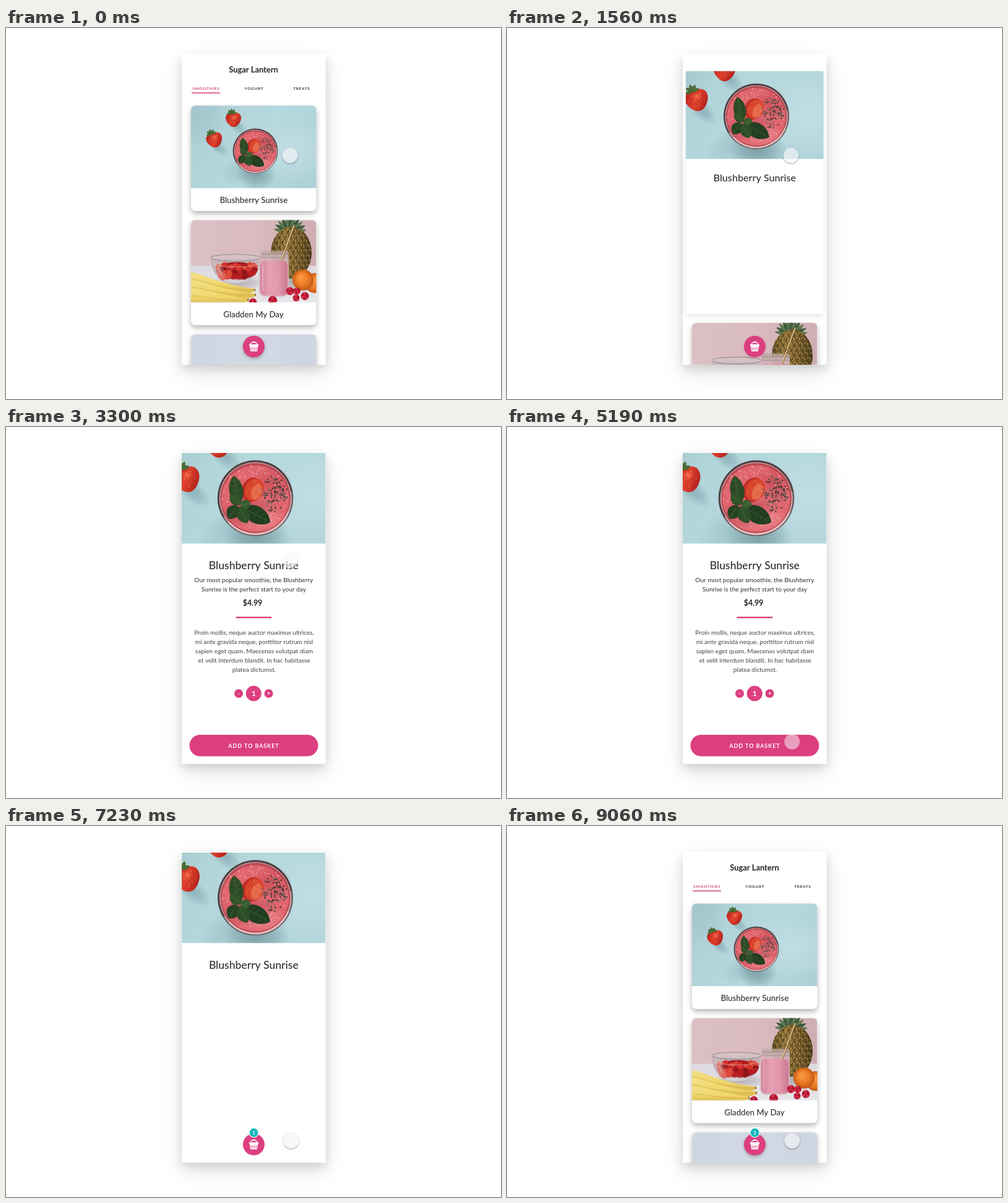
An HTML page with a canvas that plays this animation: 800x600 px, repeating every 9150 ms.

```html
<!DOCTYPE html>
<html lang="en">
<head>
<meta charset="utf-8">
<title>Smoothie shop</title>
<style>
html, body { margin: 0; width: 100%; height: 100%; overflow: hidden; background: #fff; }
canvas { display: block; width: 800px; height: 600px; }
</style>
</head>
<body>
<canvas id="stage" width="800" height="600"></canvas>
<script>
const ctx = document.getElementById('stage').getContext('2d');
const LOOP = 9150;
const PINK = '#dc3f80', INK = '#303033', TEAL = '#14b8bd';
const DRINK = 'Blushberry Sunrise';
const INTRO = ['Our most popular smoothie, the Blushberry', 'Sunrise is the perfect start to your day'];
const BODY = [
  'Proin mollis, neque auctor maximus ultrices,',
  'mi ante gravida neque, porttitor rutrum nisl',
  'sapien eget quam. Maecenas volutpat diam',
  'et velit interdum blandit. In hac habitasse',
  'platea dictumst.'
];

// timing helpers
const clamp = v => Math.max(0, Math.min(1, v));
const mix = (a, b, p) => a + (b - a) * p;
const inOut = u => u < 0.5 ? 4 * u ** 3 : 1 - 4 * (1 - u) ** 3;
const back = u => 1 + 2.7 * (u - 1) ** 3 + 1.7 * (u - 1) ** 2;
const ramp = (t, start, len) => clamp((t - start) / len);
const span = (t, on, onLen, off, offLen) => ramp(t, on, onLen) - ramp(t, off, offLen);

function random(seed) {
  return () => (seed = (seed * 16807) % 2147483647) / 2147483647;
}

// drawing helpers
function layer(draw, alpha = 1) {
  if (alpha <= 0) return;
  ctx.save();
  ctx.globalAlpha *= alpha;
  draw();
  ctx.restore();
}

function shadow(color, blur, y) {
  ctx.shadowColor = color;
  ctx.shadowBlur = blur;
  ctx.shadowOffsetY = y;
}

function gradient(x0, y0, x1, y1, ...colors) {
  const g = ctx.createLinearGradient(x0, y0, x1, y1);
  colors.forEach((c, i) => g.addColorStop(i / (colors.length - 1), c));
  return g;
}

function oval(x, y, rx, ry, fill, rot = 0) {
  ctx.beginPath();
  ctx.ellipse(x, y, rx, ry, rot, 0, 7);
  ctx.fillStyle = fill;
  ctx.fill();
}

const disc = (x, y, r, fill) => oval(x, y, r, r, fill);

function box(x, y, w, h, r, fill) {
  ctx.beginPath();
  ctx.roundRect(x, y, w, h, r);
  ctx.fillStyle = fill;
  ctx.fill();
}

function stroke(color, width, ...pts) {
  ctx.beginPath();
  pts.forEach(([x, y]) => ctx.lineTo(x, y));
  ctx.strokeStyle = color;
  ctx.lineWidth = width;
  ctx.stroke();
}

function blur(x, y, rx, ry, rgb, a, rot = 0) {
  layer(() => {
    ctx.translate(x, y);
    ctx.rotate(rot);
    ctx.scale(rx, ry);
    const g = ctx.createRadialGradient(0, 0, 0, 0, 0, 1);
    g.addColorStop(0, `rgba(${rgb},${a})`);
    g.addColorStop(0.5, `rgba(${rgb},${a * 0.6})`);
    g.addColorStop(1, `rgba(${rgb},0)`);
    disc(0, 0, 1, g);
  });
}

function text(str, x, y, size, { weight = 400, color = INK, gap = 0 } = {}) {
  ctx.font = `${weight} ${size}px Lato, sans-serif`;
  ctx.letterSpacing = gap + 'px';
  ctx.textAlign = 'center';
  ctx.textBaseline = 'alphabetic';
  ctx.fillStyle = color;
  ctx.fillText(str, x + gap / 2, y + size * 0.35);
}

function leaf(x, y, len, wide, rot, fill) {
  layer(() => {
    ctx.translate(x, y);
    ctx.rotate(rot);
    ctx.beginPath();
    ctx.moveTo(0, 0);
    ctx.bezierCurveTo(len * 0.2, -wide, len * 0.75, -wide, len, 0);
    ctx.bezierCurveTo(len * 0.75, wide, len * 0.2, wide, 0, 0);
    ctx.fillStyle = fill;
    ctx.fill();
    ctx.globalAlpha *= 0.3;
    stroke('#8fb970', 0.5, [1, 0], [len * 0.9, 0]);
    for (let i = 0.25; i < 0.8; i += 0.18) {
      stroke('#6f9d55', 0.35, [len * (i + 0.1), -wide * 0.5], [len * i, 0], [len * (i + 0.1), wide * 0.5]);
    }
  });
}

function strawberry(x, y, s, rot) {
  layer(() => {
    ctx.translate(x, y);
    ctx.rotate(rot);
    ctx.scale(s, s);
    ctx.beginPath();
    ctx.moveTo(0, -9);
    ctx.bezierCurveTo(12, -12, 17, -2, 10, 7);
    ctx.bezierCurveTo(4, 15, -3, 15, -8, 8);
    ctx.bezierCurveTo(-15, -1, -12, -12, 0, -9);
    ctx.fillStyle = gradient(-11, -8, 11, 10, '#b8211c', '#df3f2b', '#a81c1a');
    ctx.fill();
    const rnd = random(31);
    for (let i = 0; i < 20; i++) {
      const a = rnd() * 6.3, d = Math.sqrt(rnd()) * 9;
      oval(Math.cos(a) * d, Math.sin(a) * d, 0.4, 0.6, '#e88a5c');
    }
    blur(2, -2, 6, 5, '255,130,90', 0.45);
    for (let i = 0; i < 5; i++) leaf(-1, -9, 8, 2.4, 0.1 + i * 0.74 - Math.PI, '#44622f');
  });
}

// Photo of the drink, in units around the middle of the glass
function drinkPhoto() {
  ctx.fillStyle = gradient(-104, -60, 100, 60, '#adcfd5', '#b5d9de', '#add0d7');
  ctx.fillRect(-150, -120, 300, 240);
  blur(-92, -60, 50, 60, '120,158,168', 0.2);
  blur(60, 0, 60, 50, '215,234,238', 0.4);
  blur(-60, -6, 20, 10, '90,128,138', 0.4, 0.7);
  blur(-29, -40, 18, 10, '90,128,138', 0.4, 0.7);
  blur(-20, 30, 40, 22, '100,140,150', 0.25, -0.5);
  blur(2, 38, 32, 26, '75,110,118', 0.5);
  strawberry(-67, -19, 1.04, -0.35);
  strawberry(-36, -52, 1, -0.1);

  disc(0, 0, 36.5, '#6a5d60');
  disc(0, 0.5, 35, '#cfa3a5');
  disc(0, 0, 33.8, '#b94a55');
  oval(0, 0.5, 32.5, 32, '#e0656e');
  blur(5, 20, 26, 13, '245,160,165', 0.6);
  blur(16, -16, 18, 15, '190,62,72', 0.5);
  const rnd = random(77);
  for (let i = 0; i < 110; i++) {
    const a = rnd() * 6.3, d = 22 + rnd() * 10;
    disc(Math.cos(a) * d, Math.sin(a) * d, 0.3 + rnd() * 0.5, 'rgba(250,195,195,.6)');
  }
  oval(-3, -8, 10, 12, '#bd2c25', 0.4);
  oval(-1, -8, 9, 11, '#d9432c', 0.4);
  oval(1, -6, 5, 8, '#e4694a', 0.4);
  for (let i = 0; i < 18; i++) disc(-9 + rnd() * 15, -17 + rnd() * 18, 0.4, '#efa878');
  for (let i = 0; i < 115; i++) {
    const a = rnd() * 6.3, d = Math.sqrt(rnd());
    oval(18 + Math.cos(a) * d * 13, -4 + Math.sin(a) * d * 17, 0.7, 0.95,
      rnd() < 0.6 ? '#4b3b39' : '#8a6b63', rnd() * 3);
  }
  blur(-8, 14, 26, 14, '110,20,35', 0.4);
  leaf(-16, 6, 28, 9, -1.75, '#2c4a26');
  leaf(-18, 7, 15, 8, 2.1, '#233f21');
  leaf(-12, 9, 30, 11, 0.5, '#213d20');
  leaf(-16, 8, 18, 8, 1.1, '#2a4c26');
  leaf(-14, 8, 10, 6, -0.4, '#365a2e');
  leaf(-14, 6, 14, 7, -2.4, '#2e5029');
  ctx.beginPath();
  ctx.arc(0, 0, 35.4, 2.6, 6.1);
  ctx.strokeStyle = '#4e4042';
  ctx.lineWidth = 1.6;
  ctx.stroke();
  ctx.beginPath();
  ctx.arc(0, 0, 34.5, 0.4, 2.4);
  ctx.strokeStyle = 'rgba(245,225,225,.6)';
  ctx.lineWidth = 1.4;
  ctx.stroke();
}

function raspberry(x, y, s = 1) {
  disc(x, y, 6.5 * s, '#c31f3b');
  for (let i = 0; i < 7; i++) {
    disc(x + Math.cos(i * 0.9) * 3.8 * s, y + Math.sin(i * 0.9) * 3.8 * s, 1.7 * s, i % 2 ? '#dc3a55' : '#a8142f');
  }
}

function orange(x, y, r) {
  const g = ctx.createRadialGradient(x - 4, y - 5, 1, x, y, r);
  g.addColorStop(0, '#fb9a45');
  g.addColorStop(0.6, '#ec7a24');
  g.addColorStop(1, '#c25814');
  disc(x, y, r, g);
}

function banana(y, tipX, tipY) {
  ctx.beginPath();
  ctx.moveTo(-4, y);
  ctx.bezierCurveTo(18, y + 1, 40, tipY - 9, tipX, tipY - 2);
  ctx.lineTo(tipX + 1, tipY + 2);
  ctx.bezierCurveTo(tipX - 15, tipY + 9, 40, tipY + 14, -4, y + 23);
  ctx.fillStyle = gradient(0, y, 0, tipY + 10, '#f3e08a', '#f0d76b', '#d4b045');
  ctx.fill();
  ctx.beginPath();
  ctx.moveTo(-4, y + 11);
  ctx.bezierCurveTo(25, y + 13, 50, tipY + 2, tipX, tipY);
  ctx.strokeStyle = 'rgba(160,125,35,.4)';
  ctx.lineWidth = 0.8;
  ctx.stroke();
  oval(tipX, tipY, 1.2, 2, '#8a7440');
}

function bowl() {
  layer(() => {
    ctx.beginPath();
    ctx.moveTo(32, 61);
    ctx.bezierCurveTo(34, 88, 46, 102, 72, 102);
    ctx.bezierCurveTo(98, 102, 110, 88, 112, 61);
    ctx.closePath();
    ctx.fillStyle = gradient(0, 60, 0, 102, '#cfb9bd', '#b9a3a6', '#c9c6cb');
    ctx.fill();
    ctx.clip();
    oval(74, 82, 33, 14, '#a51c1f');
    const rnd = random(1900);
    for (let i = 0; i < 30; i++) {
      oval(44 + i % 8 * 8 + rnd() * 5, 73 + Math.floor(i / 8) * 6 + rnd() * 4, 6, 4.2,
        ['#b81e22', '#d8332c', '#d94a3a', '#8f1519'][Math.floor(rnd() * 4)], rnd() * 3);
    }
    blur(46, 82, 9, 20, '235,230,235', 0.45, -0.4);
    blur(72, 99, 34, 5, '225,222,228', 0.6);
    stroke('rgba(245,240,242,.45)', 1, [36, 72], [60, 76], [88, 76], [109, 71]);
  });
  ctx.beginPath();
  ctx.ellipse(72, 61, 40, 5.5, 0, 0, 7);
  ctx.fillStyle = 'rgba(215,200,205,.45)';
  ctx.fill();
  ctx.strokeStyle = '#8d8e93';
  ctx.lineWidth = 1.2;
  ctx.stroke();
}

// Photo of the fruit table, 202 by 133 units from its top left corner
function fruitPhoto() {
  ctx.fillStyle = gradient(0, 0, 202, 20, '#dcc0c4', '#d9bbc0', '#cfadb2');
  ctx.fillRect(0, 0, 202, 80);
  ctx.fillStyle = gradient(0, 73, 0, 133, '#dcdae0', '#e6e5e9');
  ctx.fillRect(0, 74, 202, 60);
  blur(165, 100, 50, 20, '120,105,115', 0.45);
  blur(75, 102, 50, 12, '120,105,115', 0.4);

  for (let i = 0; i < 11; i++) leaf(160, 20, 27, 4, -Math.PI + 0.2 + i * 0.28, i % 2 ? '#38533a' : '#5a734e');
  layer(() => {
    ctx.beginPath();
    ctx.ellipse(162, 53, 33, 42, 0, 0, 7);
    ctx.clip();
    ctx.fillStyle = gradient(128, 0, 196, 0, '#57461f', '#99783a', '#7c5e2b', '#413419');
    ctx.fillRect(125, 8, 74, 90);
    for (let row = 0; row < 12; row++) {
      for (let col = 0; col < 9; col++) {
        const x = 126 + col * 9 + row % 2 * 4.5, y = 10 + row * 8;
        oval(x, y, 3.2, 3, 'rgba(205,165,88,.5)');
        oval(x, y + 1, 1.2, 1.4, '#43361c');
      }
    }
    for (let i = -60; i < 150; i += 9) {
      stroke('rgba(50,50,28,.55)', 1.2, [110 + i, 8], [160 + i, 97]);
      stroke('rgba(50,50,28,.55)', 1.2, [110 + i, 97], [160 + i, 8]);
    }
  });

  bowl();

  // jar and straw
  box(110, 54, 48, 70, 9, 'rgba(214,180,189,.9)');
  box(112, 66, 44, 56, 8, gradient(112, 0, 156, 0, '#d4819a', '#e6a0b3', '#e095aa', '#cb7891'));
  box(113, 50, 45, 12, 3, 'rgba(190,172,168,.8)');
  stroke('#9b8583', 1, [113, 55], [158, 55]);
  stroke('#a88f92', 0.8, [112, 61], [158, 61]);
  stroke('#8f6f40', 2.6, [146, 66], [167, 8]);
  stroke('#ead2a2', 1.3, [145.5, 66], [166.5, 8]);
  const rnd = random(5);
  for (let i = 0; i < 60; i++) disc(115 + rnd() * 38, 68 + rnd() * 50, 0.5, 'rgba(250,208,218,.5)');
  stroke('rgba(255,255,255,.35)', 1.6, [116, 70], [116, 115]);

  orange(200, 102, 16);
  orange(181, 97, 17);
  blur(40, 130, 65, 8, '130,110,90', 0.5);
  banana(84, 103, 113);
  banana(97, 104, 121);
  banana(111, 92, 129);
  raspberry(160, 115);
  raspberry(171, 115, 0.9);
  raspberry(170, 126, 0.85);
  raspberry(184, 123);
  raspberry(132, 130, 1.1);
  raspberry(100, 133);
}

function cardBase(x, y, w, h, r, depth = 1) {
  layer(() => {
    shadow(`rgba(0,0,0,${0.3 * depth})`, 9, 4);
    box(x, y, w, h, r, '#fff');
  });
}

function clipBox(x, y, w, h, r) {
  ctx.beginPath();
  ctx.roundRect(x, y, w, h, [r, r, 0, 0]);
  ctx.clip();
}

function header(alpha) {
  layer(() => {
    text('Sugar Lantern', 400, 67.5, 12.9, { weight: 700, color: '#222' });
    const tab = { weight: 700, gap: 0.75 };
    text('SMOOTHIES', 323, 98, 6.4, { ...tab, color: '#d03f76' });
    text('YOGURT', 400.5, 98, 6.4, tab);
    text('TREATS', 477.5, 98, 6.4, tab);
    box(300, 104.2, 46, 1.5, 0, '#d03f76');
  }, alpha);
}

function lowerCards(shift) {
  const y = 310.5 + shift;
  if (y > 560) return;
  cardBase(299, y, 202.5, 170, 7);
  layer(() => {
    clipBox(299, y, 202.5, 133, 7);
    ctx.translate(299, y);
    fruitPhoto();
  });
  text('Gladden My Day', 400, y + 152.5, 13.2, { weight: 500 });
  layer(() => {
    shadow('rgba(0,0,0,.25)', 9, 3);
    box(299, y + 185, 202.5, 170, 7, gradient(299, 0, 501, 0, '#d0d6e1', '#d3d9e4', '#cfd5e0'));
  });
}

function mainCard(p) {
  const x = mix(299, 284, p), w = mix(202.5, 232.5, p);
  const y = mix(125.5, 42, p), bottom = mix(296, 544.5, p);
  const photoH = mix(133.5, 146.5, p), r = mix(7, 0, p);
  cardBase(x, y, w, bottom - y, r, 1 - p);
  layer(() => {
    clipBox(x, y, w, photoH, r);
    ctx.translate(403, y + mix(73.5, 73, p));
    ctx.scale(mix(1, 1.68, p), mix(1, 1.68, p));
    drinkPhoto();
  });
  text(DRINK, 400.3, y + photoH + mix(19, 35.5, p), mix(13.3, 17.6, p), { weight: 500 });
}

function details(t) {
  const show = (on, len, off) => span(t, on, len, off, 250);
  layer(() => INTRO.forEach((s, i) => text(s, 400.3, 247.5 + i * 15, 10.1)), show(1740, 200, 6800));
  layer(() => text('$4.99', 398.5, 285, 12.3, { weight: 700, color: '#222' }), show(1800, 200, 6760));

  // the rule grows past its final width, then settles
  const grow = ramp(t, 1840, 240) - inOut(ramp(t, 6700, 300));
  const w = 58 * grow + 8 * Math.sin(Math.PI * ramp(t, 1860, 420));
  if (grow > 0.01) box(400.3 - w / 2, 306.7, w, 2.6, 1, PINK);

  const body = show(1980, 300, 6650);
  layer(() => BODY.forEach((s, i) => text(s, 401, 332 - 3 * (1 - body) + i * 15, 10.1, { color: '#444' })), body);
}

function stepper(t) {
  const pop = (on, off) => t > on ? back(ramp(t, on, 300)) * (1 - ramp(t, off, 200)) : 0;
  const knob = (x, r, label, size, s) => {
    if (s <= 0.01) return;
    layer(() => {
      ctx.translate(x, 431);
      ctx.scale(s, s);
      disc(0, 0, r, PINK);
      text(label, 0, 0, size, { weight: 700, color: '#fff' });
    });
  };
  const side = pop(2460, 5720);
  knob(376, 7, '–', 8, side);
  knob(424.5, 7, '+', 9, side);
  knob(400.2, 12.5, '1', 12, pop(2380, 5780));
}

function basket() {
  ctx.strokeStyle = '#fff';
  ctx.lineWidth = 1.1;
  ctx.beginPath();
  ctx.moveTo(-5.5, -3);
  ctx.bezierCurveTo(-4.5, -8.2, 4.5, -8.2, 5.5, -3);
  ctx.stroke();
  box(-2.5, -8, 5, 1.8, 0.8, '#fff');
  box(-7.7, -3.4, 15.4, 2.5, 1, '#fff');
  ctx.beginPath();
  ctx.moveTo(-6.8, -1);
  ctx.lineTo(6.8, -1);
  ctx.lineTo(5.3, 8);
  ctx.lineTo(-5.3, 8);
  ctx.fillStyle = '#fff';
  ctx.fill();
  for (let i = -1.5; i < 2; i++) stroke(PINK, 0.9, [i * 2.9, 1], [i * 2.5, 6.5]);
}

function button(t, open) {
  const wide = inOut(ramp(t, 2330, 420)) - inOut(ramp(t, 5680, 420));
  const half = mix(17.5, 104, wide);
  layer(() => {
    shadow(`rgba(0,0,0,${0.3 * (1 - open)})`, 5, 2);
    box(400.4 - half, 497.7, half * 2, 34.8, 17.4, PINK);
  });
  layer(() => {
    ctx.translate(400.5, 515);
    basket();
  }, clamp(1 - wide * 3));
  layer(() => text('ADD TO BASKET', 400, 515.5, 9, { weight: 700, color: '#fff', gap: 0.9 }), clamp(wide * 2 - 1));

  if (t > 6150) layer(() => {
    const s = back(ramp(t, 6150, 280));
    ctx.translate(400.5, 496);
    ctx.scale(s, s);
    disc(0, 0, 8, '#fff');
    disc(0, 0, 6.9, TEAL);
    text('1', 0, 0, 8, { weight: 700, color: '#fff' });
  });
}

function touch(t) {
  const move = inOut(ramp(t, 3060, 1190));
  const press = 1 - ramp(t, 2950, 450) + ramp(t, 5250, 250);
  const x = mix(459, 460.7, move), y = mix(206, 509, move);
  layer(() => {
    ctx.beginPath();
    ctx.rect(0, 0, 800, 600);
    ctx.arc(x, y, 12.5, 0, 7);
    ctx.clip('evenodd');
    shadow(`rgba(0,0,0,${0.1 + 0.35 * press})`, 3, 1);
    disc(x, y, 12.2, '#fff');
  });
  disc(x, y, 12.4, `rgba(245,245,248,${mix(0.52, 0.62, press)})`);
}

function phone() {
  for (const [a, b, y] of [[0.11, 34, 13], [0.12, 14, 6]]) {
    layer(() => {
      shadow(`rgba(0,0,0,${a})`, b, y);
      box(284, 41.5, 232.5, 503, 0, '#fff');
    });
  }
}

function draw(t) {
  ctx.fillStyle = '#fff';
  ctx.fillRect(0, 0, 800, 600);
  phone();
  const open = inOut(ramp(t, 1200, 640)) - inOut(ramp(t, 7133, 674));
  layer(() => {
    ctx.beginPath();
    ctx.rect(284, 41.5, 232.5, 503);
    ctx.clip();
    header(1 - span(t, 1030, 220, 7700, 280));
    lowerCards(248.5 * open);
    mainCard(open);
    details(t);
    stepper(t);
    button(t, open);
  });
  touch(t);
}

const start = performance.now();
function tick() {
  draw((performance.now() - start) % LOOP);
  requestAnimationFrame(tick);
}
draw(0);
requestAnimationFrame(tick);
</script>
</body>
</html>
```
